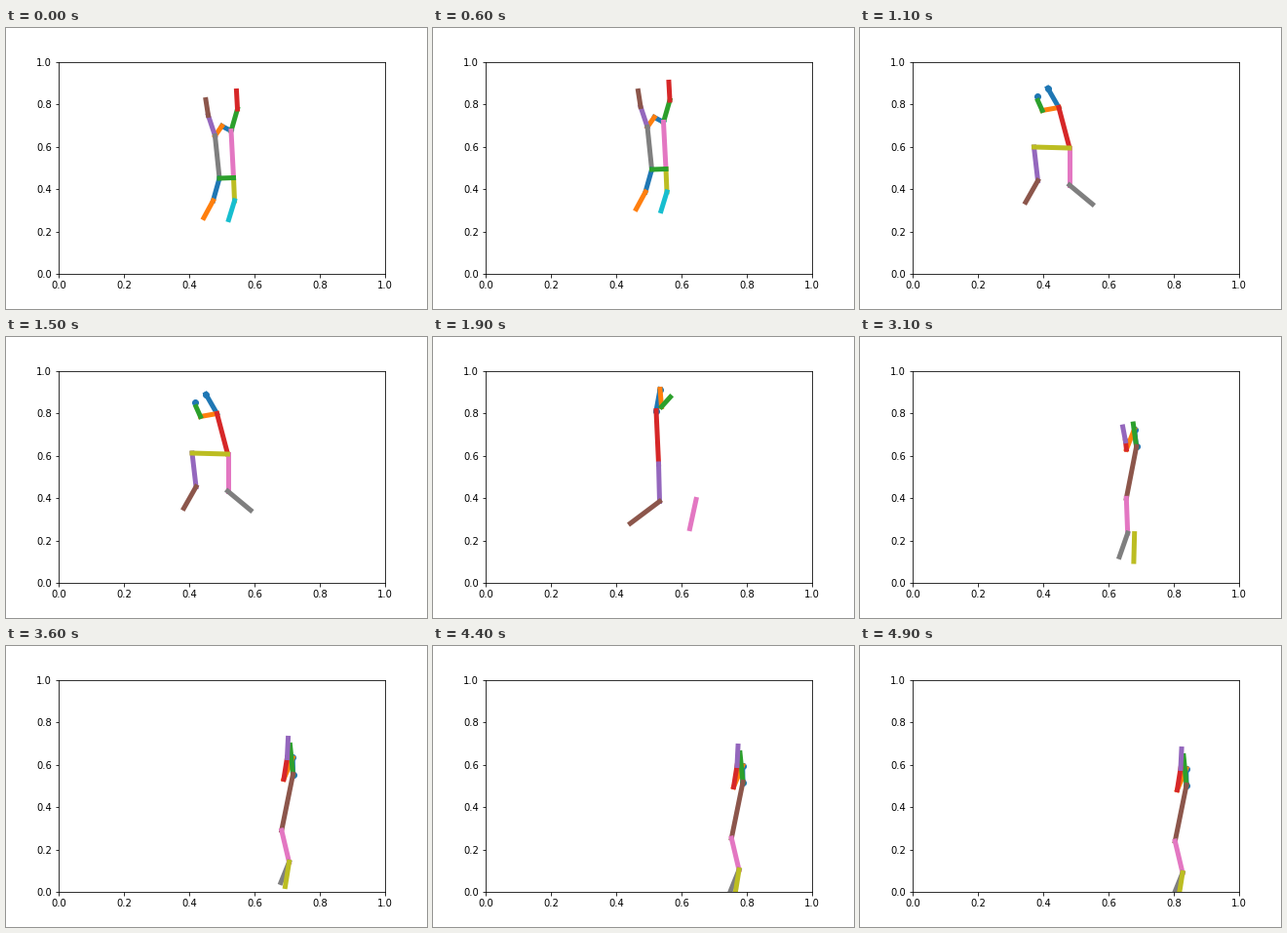
Recreate the animation shown at these times as a matplotlib script. Size 432 px wide and 288 px high, loop 5000 ms.

```python
import numpy as np
import matplotlib.pyplot as plt
from matplotlib.animation import FuncAnimation

WIDTH, HEIGHT, DPI = 432, 288, 72
FRAMES, INTERVAL = 50, 100
LEFT, RIGHT, BOTTOM, TOP = 0.125, 0.9, 0.125, 0.88

# The shoulder's route over the stage; every pose hangs from it.
ROUTE_FRAMES = [0, 6, 11, 19, 26, 30, 36, 44, 49]
ROUTE_X = [230.5, 236, 203.5, 228.5, 253, 281, 294, 317.5, 334.5]
ROUTE_Y = [105, 96, 81, 75, 86.5, 108, 131, 139, 142]

# Joint offsets from the shoulder s in pixels, y down:
# e elbow, w wrist, h hip, k knee, f foot
FRONT = dict(neck=(-9.5, -5), e=(6.5, -22.5), w=(5.5, -41),
             s2=(-16.5, 5), e2=(-23.5, -16), w2=(-26, -32),
             h=(2.5, 48), k=(3.5, 71.5), f=(-2.5, 91),
             h2=(-12, 48.5), k2=(-18.5, 71.5), f2=(-28, 89))
TURN = dict(w=(-11.5, -20), e2=(-17, 3), w2=(-21.5, -7), hand=(-22.5, -11.5),
            h=(11, 41.5), k=(11, 79.5), f=(34.5, 99),
            h2=(-25.5, 40.5), k2=(-21.5, 75), f2=(-34, 97))
STRIDE = dict(head=(4, -22), e=(5.5, -4), w=(14.5, -14),
              h=(2.5, 54.5), k=(3.5, 93), f=(-26.5, 115.5),
              k2=(41, 91), f2=(34.5, 121))
LAND = dict(head=(-4, -18.5), e=(-11, 0.5), w=(-16.5, 5.5), tip=(-23, -3.5),
            e2=(-3.5, -16.5), h=(-9, 48.5), k=(-14, 87.5), f=(-22.5, 115),
            k2=(0, 88.5), f2=(2.5, 120.5))
CROUCH = dict(head=(-0.3, -17), e=(-9.5, 5), w=(-6, -17), tip=(-5, -37),
              e2=(-3, -30), h=(-11.7, 57.5), k=(-4, 90), f=(-12.5, 111),
              k2=(-4, 90), f2=(-8, 115))

# First frame, start pose, end pose, limbs in drawing order, dotted joints
PHASES = [
    (0, FRONT, FRONT, "neck-s neck-s2 s-e e-w s2-e2 e2-w2 s-h s2-h2 "
                      "h-k k-f h2-k2 k2-f2 h2-h", ""),
    (7, TURN, TURN, "w-s e2-s w2-e2 s-h h2-k2 k2-f2 h-k k-f h2-h", "w hand"),
    (19, STRIDE, STRIDE, "s-head head-e e-w s-h h-k k-f k2-f2", "head s"),
    (23, LAND, CROUCH, "s-head head-e e2-s e-w w-tip s-h h-k k-f k2-f2",
     "head s"),
]
BLEND_FRAMES = [26, 36]


def to_axes(x, y):
    """Pixel centres on the stage (y down) to axes units."""
    return (((x + 0.5) / WIDTH - LEFT) / (RIGHT - LEFT),
            (1 - (y + 0.5) / HEIGHT - BOTTOM) / (TOP - BOTTOM))


def place_joints(frame, start, end):
    root = np.array([np.interp(frame, ROUTE_FRAMES, ROUTE_X),
                     np.interp(frame, ROUTE_FRAMES, ROUTE_Y)])
    t = np.interp(frame, BLEND_FRAMES, [0, 1])
    joints = {"s": to_axes(*root)}
    for name in start:
        offset = (1 - t) * np.array(start[name]) + t * np.array(end[name])
        joints[name] = to_axes(*(root + offset))
    return joints


plt.rcParams.update({"font.family": "DejaVu Sans", "font.size": 10})
fig = plt.figure(figsize=(WIDTH / DPI, HEIGHT / DPI), dpi=DPI)
fig.subplots_adjust(left=LEFT, right=RIGHT, bottom=BOTTOM, top=TOP)
ax = fig.add_subplot()
ax.set(xlim=(0, 1), ylim=(0, 1))

dots = ax.scatter([], [], s=36, color="C0", zorder=1.9)
lines = [ax.plot([], [], color=f"C{i % 10}", lw=5)[0] for i in range(13)]


def draw(frame):
    _, start, end, limbs, dotted = [p for p in PHASES if p[0] <= frame][-1]
    joints = place_joints(frame, start, end)
    for line in lines:
        line.set_data([], [])
    for line, limb in zip(lines, limbs.split()):
        a, b = limb.split("-")
        line.set_data(*zip(joints[a], joints[b]))
    dots.set_offsets([joints[n] for n in dotted.split()] or np.empty((0, 2)))
    return [dots, *lines]


anim = FuncAnimation(fig, draw, frames=FRAMES, interval=INTERVAL,
                     init_func=lambda: draw(0), repeat=True, repeat_delay=0)
plt.show()
```
